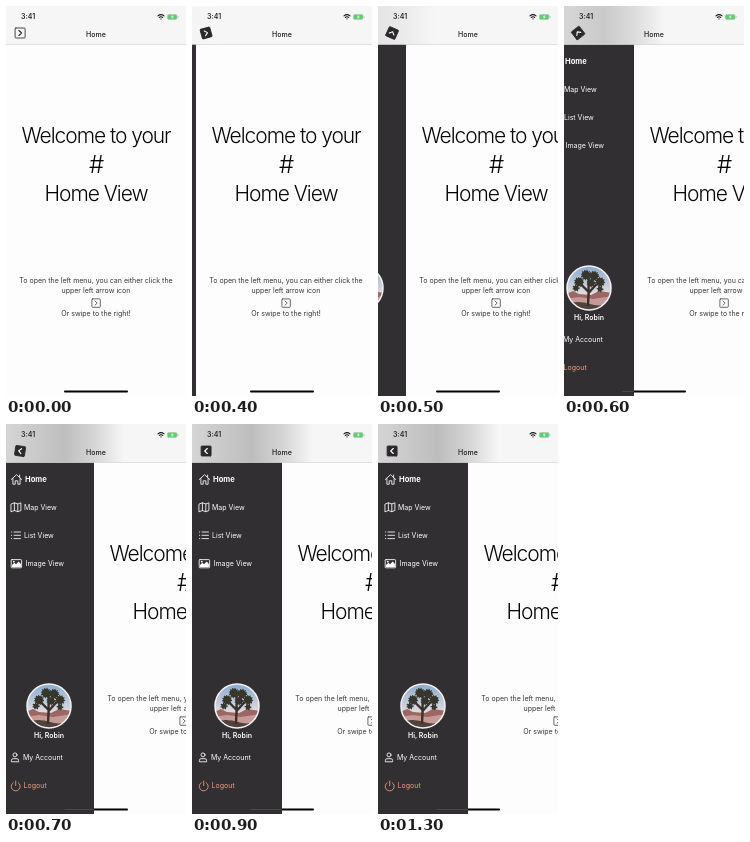
These frames come from a looping animation (180 px wide and 390 px high, 1.4 s). An HTML page:

```html
<!DOCTYPE html>
<html lang="en">
<head>
<meta charset="utf-8">
<title>Side menu</title>
<style>
  html, body { margin: 0; width: 100%; height: 100%; overflow: hidden; background: #fefdfe; }
  svg { display: block; width: 180px; height: 390px; }
  text { font-family: Inter, "Liberation Sans", sans-serif; font-size: 7px; }
  .big { font-size: 21px; font-weight: 350; letter-spacing: -.05em; fill: #080808; }
  .mid { text-anchor: middle; }
  .note { font-size: 7.03px; fill: #383838; }
  .bold { font-weight: 700; }
  .line { fill: none; stroke-width: .85; stroke-linejoin: round; stroke-linecap: round; }
</style>
</head>
<body>
<svg viewBox="0 0 180 390">
  <defs>
    <linearGradient id="shade" gradientUnits="userSpaceOnUse" x1="-90" x2="30">
      <stop offset="0" stop-color="#d6d5d6"/>
      <stop offset=".5" stop-color="#bebdbe"/>
      <stop offset=".75" stop-color="#d5d4d5"/>
      <stop offset="1" stop-color="#f7f6f7"/>
    </linearGradient>
    <linearGradient id="sky" x2="0" y2="1">
      <stop offset="0" stop-color="#86a9cd"/>
      <stop offset=".6" stop-color="#dcd9df"/>
    </linearGradient>
    <clipPath id="round"><circle cx="45" cy="282" r="22"/></clipPath>
  </defs>

  <g id="slider">
    <g id="page">
      <text class="big mid" x="90" y="137">Welcome to your</text>
      <text class="big mid" x="90" y="167" style="font-size:24px">#</text>
      <text class="big mid" x="90" y="194.5">Home View</text>
      <text class="note mid" x="90" y="277.3">To open the left menu, you can either click the</text>
      <text class="note mid" x="90" y="287">upper left arrow icon</text>
      <g class="line" stroke="#444" style="stroke-width:.8">
        <rect x="85.9" y="292.9" width="8.4" height="8.4" rx=".8"/>
        <path d="M89 295l2.2 2.1-2.2 2.1"/>
      </g>
      <text class="note mid" x="90" y="310">Or swipe to the right!</text>
    </g>

    <g id="menu" transform="translate(-90)" fill="#fff">
      <rect width="90" height="390" fill="#312f31"/>
      <g class="line" stroke="#fff">
        <path d="M7.3 55.5l5.2-4.8 5.2 4.8M8.9 54.6v5.6h2.3v-3.4h2.6v3.4h2.3v-5.6M15.6 51v2"/>
        <path d="M7.3 80l3.1-1.2 3.4 1.2 3.1-1.2v7.7l-3.1 1.2-3.4-1.2-3.1 1.2zM10.4 79v7.5M13.8 80v7.5"/>
        <path d="M10 108h6.5M10 111.3h6.5M10 114.6h6.5M7.4 108h.3M7.4 111.3h.3M7.4 114.6h.3"/>
        <rect x="7.2" y="135.6" width="10.4" height="8.2" rx=".8"/>
        <circle cx="11" cy="330.9" r="2"/>
        <path d="M7.4 337.4v-1q0-1.7 1.7-1.7h3.8q1.7 0 1.7 1.7v1z"/>
      </g>
      <path d="M8 143v-2l2.3-2.3 1.8 1.6 2.6-2.8 2.2 2.6v2.9z"/>
      <circle cx="9.8" cy="137.7" r=".9"/>
      <path class="line" stroke="#f0a084" d="M9.2 358.6a4.5 4.5 0 1 0 5 0M11.7 357v4.6"/>

      <text class="bold" x="21" y="57.6" style="font-size:7.6px">Home</text>
      <text x="20" y="86">Map View</text>
      <text x="20" y="114">List View</text>
      <text x="21.6" y="142.2">Image View</text>
      <text class="mid" x="45" y="314.2" font-weight="600">Hi, Robin</text>
      <text x="19" y="335.6">My Account</text>
      <text x="19.6" y="364" fill="#f0a084">Logout</text>

      <g clip-path="url(#round)">
        <rect x="22" y="259" width="46" height="46" fill="url(#sky)"/>
        <path d="M22 288l7-3 6 3 12 1 8-4 13 2v24H22z" fill="#9c6762"/>
        <path d="M22 293l13-2 14 2 19-3v14H22z" fill="#c69a96"/>
        <path d="M22 298q12-4 24 0t22-3v10H22z" fill="#51423c"/>
        <path d="M44 300l.6-14-8-8M44.6 287l8-9M44.6 289v-17" fill="none" stroke="#3a302b" stroke-width="2.4"/>
        <g fill="#37362c" stroke="#37362c" stroke-width="2" stroke-dasharray="1 1.2">
          <circle cx="35" cy="276" r="4"/>
          <circle cx="42" cy="269" r="4.2"/>
          <circle cx="50" cy="270" r="4.2"/>
          <circle cx="56" cy="276" r="4"/>
          <circle cx="32" cy="282" r="2.6"/>
          <circle cx="47" cy="277" r="3.4"/>
          <circle cx="56" cy="283" r="2.4"/>
        </g>
      </g>
      <circle cx="45" cy="282" r="22" fill="none" stroke="#f4f2f4" stroke-width="1.5"/>
    </g>
  </g>

  <g id="header">
    <rect width="180" height="38.5" fill="#f7f6f7"/>
    <rect id="tint" x="-120" width="150" height="38.5" fill="url(#shade)"/>
    <path d="M0 38.5h180" stroke="#cfcecf" stroke-width=".6"/>
    <text x="15" y="13.4" font-weight="600" fill="#282828">3:41</text>
    <text class="mid" x="90" y="31.4" font-weight="500" fill="#181818">Home</text>
    <g class="line" stroke="#181818" style="stroke-width:1.1">
      <path d="M152 9.9q3-2.5 6 0M153.3 11.4q1.7-1.4 3.4 0"/>
      <path d="M155 12.8v.1"/>
    </g>
    <rect x="161.4" y="8.6" width="9.6" height="4.8" rx="1.3" fill="#58d06b" stroke="#b4c4b7" stroke-width=".7"/>
    <path d="M172.1 10v2" stroke="#a9b5ab" stroke-width=".7"/>
    <path d="M166.8 8.8l-2.2 2.5h1.6l-.6 2 2.3-2.7h-1.6z" fill="#e9f5eb"/>
    <g id="toggle" class="line">
      <rect id="toggleBox" x="-5" y="-5" width="10" height="10" rx=".8" stroke="#2b292b"/>
      <path id="chevron" d="M-1.2-2.5l2.6 2.5-2.6 2.5" stroke-width="1.1"/>
    </g>
  </g>

  <rect x="58" y="384.4" width="64" height="2" rx="1" fill="#000"/>
  <rect id="dimBar" x="58" y="384.4" height="2" rx="1" fill="#4a484a"/>
</svg>
<script>
  const LOOP = 1400, STEP = 100, REST = 400, MENU_WIDTH = 90;
  const SLIDE_START = 315, SLIDE_TIME = 446;
  const part = id => document.getElementById(id);
  const set = (id, attrs) => {
    for (const name in attrs) part(id).setAttribute(name, attrs[name]);
  };
  const easePower = (u, power) =>
    u < .5 ? (2 * u) ** power / 2 : 1 - (2 - 2 * u) ** power / 2;
  const easeSine = u => (1 - Math.cos(Math.PI * u)) / 2;

  function draw(now) {
    // The picture advances in whole steps and rests before the slide.
    const time = Math.floor(now % LOOP / STEP) * STEP;
    const u = time < REST ? 0 : Math.min(1, (time - SLIDE_START) / SLIDE_TIME);
    const x = Math.round(MENU_WIDTH * easePower(u, 2.5));
    const open = u > 0;

    set('slider', { transform: `translate(${x})` });
    set('tint', { transform: `translate(${x})`, opacity: x / MENU_WIDTH });
    set('toggle', { transform: `translate(14.1 27) rotate(${-180 * easeSine(u)})` });
    set('toggleBox', { fill: open ? '#2b292b' : 'none' });
    set('chevron', { stroke: open ? '#fff' : '#2b292b' });
    set('dimBar', { width: Math.max(0, x - 58) });
  }

  const start = performance.now();
  function tick() {
    draw(performance.now() - start);
    requestAnimationFrame(tick);
  }
  tick();
</script>
</body>
</html>
```
